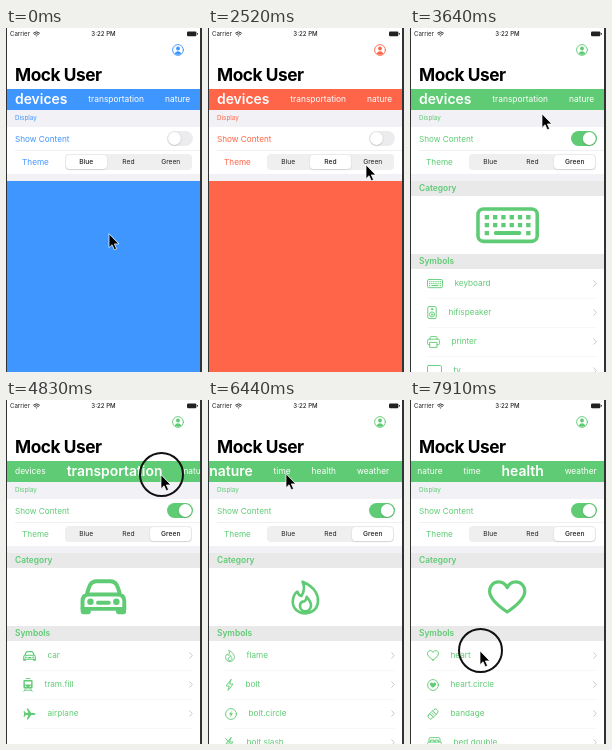
An HTML page for the animation above (8 s loop, 196 by 344 pixels).

```html
<!DOCTYPE html>
<html lang="en">
<head>
<meta charset="utf-8">
<title>Symbol browser</title>
<style>
html, body { margin: 0; width: 100%; height: 100%; overflow: hidden; background: #fff; }
#stage { position: relative; width: 196px; height: 344px; overflow: hidden; background: #fff;
  color: var(--theme); font: 8.2px/1 Inter, "Open Sans", sans-serif; white-space: nowrap; }
#stage > *, .page > * { position: absolute; }
svg { overflow: visible; fill: none; stroke: currentColor; stroke-width: .9;
  stroke-linejoin: round; stroke-linecap: round; }
svg .solid { fill: currentColor; stroke: none; }
svg .keys { stroke-width: 1.1; stroke-linecap: butt; stroke-dasharray: 1.1 1; }
.status { color: #222; font-size: 6.1px; top: 3px; }
h1 { margin: 0; left: 9px; top: 37px; color: #000; font-size: 17.3px; line-height: 20px;
  font-weight: 700; letter-spacing: -.45px; }
.bar { left: 0; top: 60.5px; width: 196px; height: 21px; background: var(--theme); overflow: hidden; }
#tabs { position: absolute; left: 9px; top: .5px; height: 20px; display: flex; gap: 21px;
  align-items: center; color: #fff; font-size: 8.4px; }
#tabs .on { position: relative; top: .8px; font-size: 13.9px; font-weight: 600; }
.strip { left: 0; width: 196px; background: #f1f1f6; }
.line { left: 9px; width: 186px; height: 1px; background: #f0f0f3; }
#switch { left: 161px; top: 103px; width: 26px; height: 15px; border-radius: 8px; }
#knob { position: absolute; left: .8px; top: .7px; width: 13.6px; height: 13.6px; border-radius: 50%;
  background: #fff; box-shadow: 0 .5px 1.5px #0004; }
.segments { left: 59px; top: 126px; width: 127px; height: 16px; border-radius: 4px; background: #efeff0; }
#pill { position: absolute; top: 1px; left: 1px; width: 41px; height: 14px; border-radius: 3.5px;
  background: #fff; box-shadow: 0 .5px 1.5px #0003; }
.segments span { position: absolute; width: 42.3px; line-height: 16px; text-align: center;
  color: #222; font-size: 6.7px; }
.segments .on { font-weight: 500; }
#fill { left: 0; top: 153px; width: 196px; height: 191px; background: var(--theme); }
.page { left: 0; top: 153px; width: 196px; height: 191px; background: #fff; }
.head { left: 0; width: 187px; padding-left: 9px; height: 15px; background: #e9e9ea;
  font-size: 8.4px; line-height: 15px; font-weight: 600; }
.hero { left: 0; top: 15px; width: 195px; height: 58px; display: flex; align-items: center; justify-content: center; }
.row { left: 17px; width: 170px; height: 29px; display: flex; align-items: center; gap: 11.5px;
  box-shadow: 0 1px #f8f8f9; }
.row .chevron { margin-left: auto; color: #c4c4c8; }
.edge { top: 0; height: 344px; background: #303234; }
#ring { width: 41px; height: 41px; margin: -22.5px; border: 2px solid #111; border-radius: 50%; }
#cursor, #ring { left: 0; top: 0; }
#cursor { margin-top: 1px; }
</style>
</head>
<body>
<div id="stage">
  <span class="status" style="left:4px">Carrier</span>
  <svg class="status" style="left:27px" width="7" height="6" viewBox="0 0 7 6"><path d="M.5 2Q3.5-.6 6.5 2M1.6 3.3Q3.5 1.7 5.4 3.3M3 4.6L3.5 5L4 4.6"/></svg>
  <span class="status" style="left:0;width:195px;text-align:center;font-weight:500">3:22 PM</span>
  <svg class="status" style="left:181px" width="11" height="6" viewBox="0 0 11 6"><rect class="solid" y=".4" width="9.4" height="4.8" rx="1.2"/><path d="M10.5 2.4V3.2"/></svg>
  <svg style="left:166px;top:16px" width="12" height="12" viewBox="0 0 12 12"><circle cx="6" cy="6" r="5.4"/><circle class="solid" cx="6" cy="4.5" r="1.9"/><path class="solid" d="M2.5 9.5Q6 4.8 9.5 9.5Q6 12 2.5 9.5"/></svg>
  <h1>Mock User</h1>
  <div class="strip" style="top:81px;height:18px"></div>
  <div class="bar"><div id="tabs"></div></div>
  <span style="left:9px;top:87px;font-size:6.3px">Display</span>
  <span style="left:9px;top:107px">Show Content</span>
  <div id="switch"><div id="knob"></div></div>
  <div class="line" style="top:122px"></div>
  <span style="left:16px;top:130px">Theme</span>
  <div class="segments"><div id="pill"></div></div>
  <div class="strip" style="top:146px;height:7px"></div>
  <div id="fill"></div>
  <div id="pages" style="left:0;top:0"></div>
  <div class="edge" style="left:0;width:1px"></div>
  <div class="edge" style="left:194px;width:2px"></div>
  <div id="ring"></div>
  <svg id="cursor" width="10" height="16.4" viewBox="0 0 11 18"><path d="M0 0V15L3.4 11.8L5.8 17.3L8.3 16.2L5.9 10.9H10.5Z" fill="#000" stroke="#fff" stroke-width=".8"/></svg>
</div>
<script>
const $ = id => document.getElementById(id);
const heartPath = 'M6 10C2.5 7.6.5 5.6.5 3.5C.5 1.8 1.7.6 3.3.6C4.5.6 5.5 1.3 6 2.4C6.5 1.3 7.5.6 8.7.6C10.3.6 11.5 1.8 11.5 3.5C11.5 5.6 9.5 7.6 6 10Z';
const boltPath = 'M6 .6L1 7H4.2L3 11.4L8 5H4.8Z';
const disc = '<circle cx="6" cy="6" r="5.4"/>';

// name: [width, height, markup]
const icons = {
  keyboard: [16, 9.2, '<rect x=".5" y=".5" width="15" height="8.2" rx="1.4"/><path class="keys" d="M2.2 2.6H13.8M2.2 4.6H13.8M2.2 6.6H3.3M12.7 6.6H13.8"/><path stroke-width="1" d="M5 6.6H11"/>'],
  hifispeaker: [10, 13, '<rect x=".8" y=".5" width="8.4" height="12" rx="1.3"/><circle cx="5" cy="8.4" r="2.5"/><circle class="solid" cx="5" cy="8.4" r="1"/><circle cx="5" cy="3.2" r=".8"/>'],
  printer: [13, 12, '<path d="M3 8.8H2Q.6 8.8.6 7.4V4.6Q.6 3.2 2 3.2H11Q12.4 3.2 12.4 4.6V7.4Q12.4 8.8 11 8.8H10M3 3.2V1.6Q3 .6 4 .6H9Q10 .6 10 1.6V3.2M3 6.4H10V11.4H3Z"/>'],
  tv: [15, 11, '<rect x=".5" y=".5" width="14" height="8.4" rx="1.2"/><path d="M5 10.6H10"/>'],
  car: [13, 10, '<g stroke-width="1.1"><path d="M1.9 4.3C2.5 2 2.9.6 4.5.6H8.5C10.1.6 10.5 2 11.1 4.3M.7 8.3V6.2Q.7 4.3 2.5 4.3H10.5Q12.3 4.3 12.3 6.2V8.3ZM5 6.6H8"/></g><path class="solid" d="M.2 8H3V9.2Q3 9.8 2.4 9.8H.8Q.2 9.8.2 9.2ZM10 8H12.8V9.2Q12.8 9.8 12.2 9.8H10.6Q10 9.8 10 9.2Z"/><circle class="solid" cx="2.9" cy="6.3" r=".9"/><circle class="solid" cx="10.1" cy="6.3" r=".9"/>'],
  'tram.fill': [10, 14, '<path class="solid" fill-rule="evenodd" d="M1.4 2H8.6Q9.6 2 9.6 3V9.2Q9.6 10.4 8.4 10.4H1.6Q.4 10.4.4 9.2V3Q.4 2 1.4 2ZM1.8 3.6V6.4H8.2V3.6ZM2 7.8V9H3.4V7.8ZM6.6 7.8V9H8V7.8Z"/><path d="M3 .6H7M2.4 11L.8 13.4M7.6 11L9.2 13.4M2 12.2H8"/>'],
  airplane: [13, 12, '<path class="solid" d="M12.8 6Q12.2 7 10.8 7H8.2L5 11.6H3.7L5.3 7H2.9L1.6 8.7H.5L1.2 6L.5 3.3H1.6L2.9 5H5.3L3.7.4H5L8.2 5H10.8Q12.2 5 12.8 6Z"/>'],
  flame: [10, 12, '<path d="M4 .6C8.5 2.5 9.5 5.5 9.3 7.5C9 10.3 7 11.5 5 11.5C2.4 11.5.6 9.8.6 7.4C.6 5.8 1.4 4.4 2.2 4C2.5 5 2.9 5.4 3.6 5.5C4.6 4 4.6 2 4 .6ZM5.4 5.8C6.8 7.4 7 8.2 6.9 9C6.7 10 6 10.8 5 10.8C3.8 10.8 3.1 9.9 3.1 8.9C3.1 8.2 3.6 7.6 4 7.4C4.6 7.6 5.3 7 5.4 5.8Z"/>'],
  bolt: [9, 12, `<path d="${boltPath}"/>`],
  'bolt.circle': [12, 12, disc + `<path class="solid" transform="translate(3.3 2.4) scale(.6)" d="${boltPath}"/>`],
  'bolt.slash': [10, 12, `<path d="${boltPath}M.6 1.6L9 10.4"/>`],
  clock: [12, 12, disc + '<path d="M6 2.6V6.4H3.4"/>'],
  alarm: [12, 12, '<circle cx="6" cy="6.4" r="4.5"/><path d="M6 3.8V6.6L7.8 7.8M.7 2.8L2.8.8M11.3 2.8L9.2.8M2.8 9.8L1.6 11.2M9.2 9.8L10.4 11.2"/>'],
  stopwatch: [11, 12, '<circle cx="5.5" cy="6.9" r="4.6"/><path d="M5.5 4V7M4.2.6H6.8M5.5.6V2.2M9.2 2.2L10 3"/>'],
  timer: [12, 12, '<path d="M6 .6A5.4 5.4 0 1 1 1.6 2.9M6 .6V2.6M6 6L3.5 3.5"/>'],
  heart: [12, 10.6, `<path stroke-width="1" d="${heartPath}"/>`],
  'heart.circle': [12, 12, disc + `<path class="solid" transform="translate(2.7 3.2) scale(.55)" d="${heartPath}"/>`],
  bandage: [12, 12, '<g transform="rotate(-45 6 6)"><rect x=".2" y="3.5" width="11.6" height="5" rx="2"/><path d="M4 3.5V8.5M8 3.5V8.5M5.3 5.2H5.4M6.6 5.2H6.7M5.3 6.8H5.4M6.6 6.8H6.7"/></g>'],
  'bed.double': [15, 11, '<path d="M2 5V1.8Q2 .6 3.2.6H11.8Q13 .6 13 1.8V5M.6 10.4V6.4Q.6 5 2 5H13Q14.4 5 14.4 6.4V10.4M.6 8.6H14.4M3.6 5V3H7V5M8 5V3H11.4V5"/>']
};

const tabNames = ['devices', 'transportation', 'nature', 'time', 'health', 'weather'];
const themes = [['Blue', '#4096ff'], ['Red', '#ff6549'], ['Green', '#5fcb74']];

// hero scale, then the listed symbols
const pageData = [
  [3.95, 'keyboard', 'hifispeaker', 'printer', 'tv'],
  [3.6, 'car', 'tram.fill', 'airplane'],
  [2.9, 'flame', 'bolt', 'bolt.circle', 'bolt.slash'],
  [3, 'clock', 'alarm', 'stopwatch', 'timer'],
  [3.2, 'heart', 'heart.circle', 'bandage', 'bed.double']
];

function icon(name, scale = 1) {
  const [w, h, body] = icons[name];
  return `<svg width="${w * scale}" height="${h * scale}" viewBox="0 0 ${w} ${h}">${body}</svg>`;
}
const row = (name, i) => `<div class="row" style="top:${88 + i * 29}px">${icon(name)}<span>${name}</span>
  <svg class="chevron" width="4" height="7" viewBox="0 0 4 7"><path d="M.7.7L3.3 3.5L.7 6.3"/></svg></div>`;
const page = ([scale, ...names]) => `<div class="page" style="position:absolute">
  <div class="head" style="top:0">Category</div><div class="hero">${icon(names[0], scale)}</div>
  <div class="head" style="top:73px">Symbols</div>${names.map(row).join('')}</div>`;

$('tabs').innerHTML = tabNames.map(n => `<span>${n}</span>`).join('');
$('pages').innerHTML = pageData.map(page).join('');
$('pill').insertAdjacentHTML('afterend',
  themes.map(([n], i) => `<span style="left:${i * 42.3}px">${n}</span>`).join(''));
const tabs = [...$('tabs').children], pages = [...$('pages').children];
const segments = [...document.querySelectorAll('.segments span')];

// Tracks: [time, value, ...]
const cursorTrack = [[0, 103, 205], [150, 103, 205], [840, 118, 132], [1120, 127, 122], [1310, 118, 135],
  [2100, 118, 135], [2520, 158, 136], [2640, 164, 135], [2900, 164, 135], [3150, 174, 111],
  [3370, 174, 111], [3640, 132, 85], [3900, 112, 71], [4350, 112, 71], [4750, 155, 74],
  [4900, 155, 74], [5320, 45, 74], [5600, 52, 72], [5950, 52, 72], [6400, 78, 73],
  [6750, 78, 73], [7020, 110, 72], [7330, 110, 72], [7840, 70, 250], [8000, 70, 250]];
const scrollTrack = [[0, 0], [4900, 0], [5320, -110], [5520, -136], [7210, -136], [7280, -130]];
const pillTrack = [[0, 0], [1480, 0], [1700, 1], [2760, 1], [2960, 2]];
const switchTrack = [[0, 0], [3270, 0], [3470, 1]];
const themeSteps = [[0, 0], [1500, 1], [2800, 2]];
const tabSteps = [[0, 0], [4130, 1], [5850, 2], [6650, 3], [7210, 4]];
const showTime = 3340;
const presses = [[1320, 1520], [2660, 2810], [3170, 3310], [3980, 4150], [4800, 5340],
  [5690, 5860], [6510, 6670], [7070, 7230], [7860, 8000]];

function tween(track, t) {
  const i = track.findIndex(k => k[0] > t);
  if (i < 0) return track.at(-1).slice(1);
  const a = track[i - 1], b = track[i];
  const p = (t - a[0]) / (b[0] - a[0]), e = p * p * (3 - 2 * p);
  return a.slice(1).map((v, k) => v + (b[k + 1] - v) * e);
}
const current = (steps, t) => steps.findLast(s => s[0] <= t)[1];
const mark = (list, index) => list.forEach((el, i) => el.classList.toggle('on', i === index));

function render(t) {
  const theme = current(themeSteps, t), tab = current(tabSteps, t);
  const [x, y] = tween(cursorTrack, t), [on] = tween(switchTrack, t);
  $('stage').style.setProperty('--theme', themes[theme][1]);
  mark(segments, theme);
  mark(tabs, tab);
  $('pill').style.transform = `translateX(${tween(pillTrack, t)[0] * 42}px)`;
  $('tabs').style.transform = `translateX(${tween(scrollTrack, t)[0]}px)`;
  $('knob').style.transform = `translateX(${on * 10.8}px)`;
  $('switch').style.background = `color-mix(in srgb, var(--theme) ${on * 100}%, #ececee)`;
  pages.forEach((el, i) => { el.style.display = t >= showTime && i === tab ? 'block' : 'none'; });
  $('cursor').style.transform = $('ring').style.transform = `translate(${x}px, ${y}px)`;
  $('ring').style.opacity = presses.some(([a, b]) => t >= a && t < b) ? 1 : 0;
}

const start = performance.now();
function frame() {
  render((performance.now() - start) % 8000);
  requestAnimationFrame(frame);
}
frame();
</script>
</body>
</html>
```
